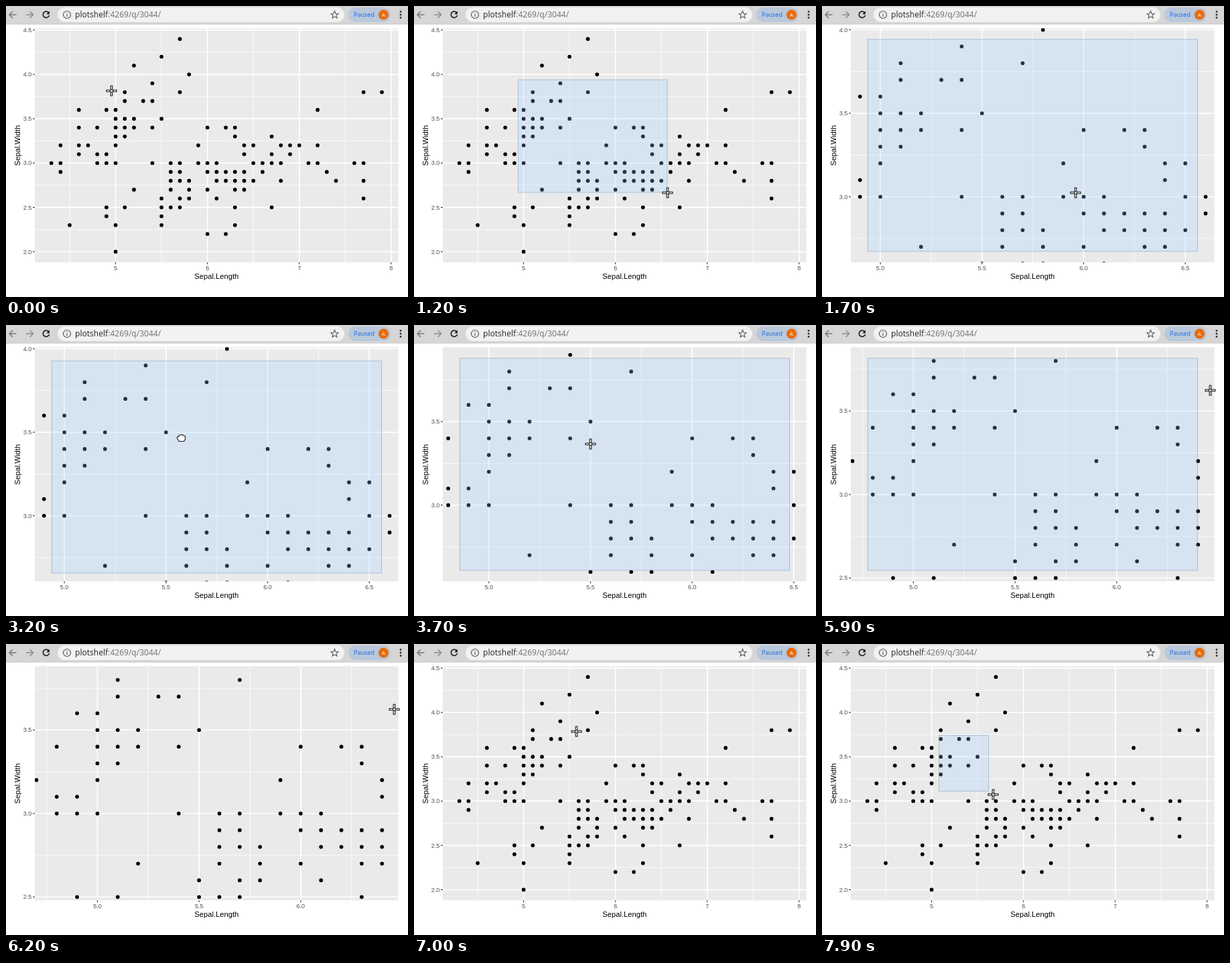
An HTML page with a canvas that plays this animation: 600x434 px, repeating every 8 s.

```html
<!DOCTYPE html>
<html lang="en">
<head>
<meta charset="utf-8">
<title>Scatter plot brushing</title>
<style>
  html, body { margin: 0; width: 100%; height: 100%; overflow: hidden; background: #fff; }
  canvas { display: block; }
</style>
</head>
<body>
<canvas id="stage" width="600" height="434"></canvas>
<script>
const c = document.getElementById('stage').getContext('2d');
const LOOP = 8000, STEP = 100;
const panel = { x: 43, y: 33.3, w: 542.7, h: 349 };
const padX = panel.w / 22, padY = panel.h / 22;

// Lengths in tenths, one row per width, from 2.0 upwards in tenths
const rows = [
  [50], [], [60, 62], [45, 50, 55, 63], [49, 55],
  [49, 51, 55, 56, 57, 63, 67], [55, 57, 58, 61, 77],
  [52, 56, 58, 60, 63, 64], [56, 57, 58, 61, 62, 63, 64, 65, 68, 74, 77],
  [44, 56, 57, 60, 61, 62, 63, 64, 66, 73],
  [43, 44, 48, 49, 50, 54, 56, 57, 59, 60, 61, 65, 66, 67, 68, 71, 72, 76, 77],
  [46, 48, 49, 64, 67, 69], [44, 46, 47, 50, 59, 64, 65, 68, 69, 70, 72],
  [50, 51, 63, 67], [46, 48, 50, 51, 52, 54, 60, 62, 63],
  [50, 51, 52, 55], [46, 49, 50, 72], [51, 53, 54], [51, 57, 77, 79],
  [54], [58], [52], [55], [], [57]
];

// Pointer path: time, x, y
const path = [
  [0, 157, 126], [200, 155, 110], [500, 155, 110], [1200, 378, 278],
  [2400, 378, 278], [2700, 268, 162], [3000, 268, 162], [3200, 261, 168],
  [3500, 236, 186], [3900, 289, 168], [4200, 289, 168], [4500, 250, 183],
  [4800, 236, 192], [4900, 236, 192], [5800, 577, 97], [5900, 579, 97],
  [6500, 579, 97], [7100, 174, 136], [7400, 174, 136], [7900, 255, 224]
];

const clamp = (v, lo, hi) => Math.min(hi, Math.max(lo, v));

function pointerAt(t) {
  const i = path.findIndex(k => k[0] >= t);
  if (i === 0) return { x: path[0][1], y: path[0][2] };
  const [t0, x0, y0] = path[i - 1], [t1, x1, y1] = path[i];
  const p = (t - t0) / (t1 - t0);
  return { x: x0 + (x1 - x0) * p, y: y0 + (y1 - y0) * p };
}

// Data limits, padded to the panel edges by the scales
function viewAt(t) {
  if (t < 1700 || t >= 6500) return { x0: 4.3, x1: 7.9, y0: 2, y1: 4.4, stepX: 1 };
  const pans = (t >= 3600) + (t >= 5000);
  const dx = -0.0813 * pans, dy = -0.0637 * pans;
  return { x0: 4.936 + dx, x1: 6.562 + dx, y0: 2.671 + dy, y1: 3.945 + dy, stepX: 0.5 };
}

function brushAt(t, p) {
  if (t >= 600 && t < 1700) return [155, 109.5, p.x + 0.5, p.y + 0.5];
  if (t >= 7500) return [174, 136, p.x - 6, p.y - 4];
  if (t < 1700 || t >= 6200) return null;
  const grip = t >= 3100 && t < 3600 ? [261, 164] : t >= 4300 && t < 5000 ? [281, 167] : null;
  const dx = grip ? clamp(p.x - grip[0], -padX, 0) : 0;
  const dy = grip ? clamp(p.y - grip[1], 0, padY) : 0;
  return [panel.x + padX + dx, panel.y + padY + dy,
    panel.x + panel.w - padX + dx, panel.y + panel.h - padY + dy];
}

function line(x0, y0, x1, y1, color, width) {
  c.strokeStyle = color;
  c.lineWidth = width;
  c.beginPath();
  c.moveTo(x0, y0);
  c.lineTo(x1, y1);
  c.stroke();
}

function disc(x, y, r, color) {
  c.fillStyle = color;
  c.beginPath();
  c.arc(x, y, r, 0, 7);
  c.fill();
}

function text(s, x, y, font, color, align = 'left') {
  c.font = font;
  c.fillStyle = color;
  c.textAlign = align;
  c.fillText(s, x, y);
}

function pill(x, y, w, h, color) {
  c.fillStyle = color;
  c.beginPath();
  c.roundRect(x, y, w, h, h / 2);
  c.fill();
}

function strokePath(d, color, width) {
  c.strokeStyle = color;
  c.lineWidth = width;
  c.stroke(new Path2D(d));
}

function drawToolbar() {
  c.fillStyle = '#d6d6d6';
  c.fillRect(0, 0, 600, 27);
  line(0, 27, 600, 27, '#c4c4c4', 1);
  strokePath('M15.5 13H5.5M10 8L5 13L10 18', '#777', 1.5);
  strokePath('M30 13H40M35.5 8L40.5 13L35.5 18', '#8c8c8c', 1.5);
  strokePath('M63.8 10A4.7 4.7 0 1 0 64.5 14', '#222', 1.7);
  c.fillStyle = '#222';
  c.fill(new Path2D('M65 7.5V12.3H60.2Z'));
  pill(77, 2, 428, 22, '#f2f2f2');
  strokePath('M96.5 13A5.5 5.5 0 1 0 85.5 13A5.5 5.5 0 1 0 96.5 13M91 12.2V16M91 9.8V11', '#555', 1.2);
  const font = '12px "Noto Sans", sans-serif', host = 'plotshelf';
  text(host, 103, 17.2, font, '#333');
  text(':4269/q/3044/', 103 + c.measureText(host).width, 17.2, font, '#777');
  let star = '';
  for (let i = 0; i < 10; i++) {
    const a = i * Math.PI / 5, r = i % 2 ? 2.6 : 5.8;
    star += (i ? 'L' : 'M') + (490.5 + r * Math.sin(a)) + ' ' + (13.3 - r * Math.cos(a));
  }
  strokePath(star + 'Z', '#555', 1.1);
  pill(511, 2, 63, 22, '#bac8dc');
  text('Paused', 519, 16.3, '9px "Noto Sans", sans-serif', '#1a6fe0');
  disc(563.5, 13, 7.6, '#ea6c0a');
  text('A', 563.5, 15.7, '7.5px "Noto Sans", sans-serif', '#fff', 'center');
  for (const y of [8.5, 13, 17.5]) disc(589, y, 1.4, '#333');
}

function ticks(lo, hi, step) {
  const pad = (hi - lo) / 20, out = [];
  for (let i = Math.ceil((lo - pad) / step); i * step <= hi + pad; i++) out.push(i * step);
  return out;
}

function drawPlot(v) {
  const { x, y, w, h } = panel, right = x + w, bottom = y + h;
  const sx = n => x + padX + (n - v.x0) / (v.x1 - v.x0) * (w - 2 * padX);
  const sy = n => bottom - padY - (n - v.y0) / (v.y1 - v.y0) * (h - 2 * padY);
  const font = '9px "Liberation Sans", Arial, sans-serif';

  c.fillStyle = '#eaeaea';
  c.fillRect(x, y, w, h);
  for (const [part, width] of [[2, 0.8], [1, 1.6]]) {
    for (const n of ticks(v.y0, v.y1, 0.5 / part)) line(x, sy(n), right, sy(n), '#fff', width);
    for (const n of ticks(v.x0, v.x1, v.stepX / part)) line(sx(n), y, sx(n), bottom, '#fff', width);
  }
  c.save();
  c.beginPath();
  c.rect(x, y, w, h);
  c.clip();
  rows.forEach((row, i) => row.forEach(n => disc(sx(n / 10), sy(2 + i / 10), 2.85, '#000')));
  c.restore();

  for (const n of ticks(v.y0, v.y1, 0.5)) {
    line(x - 3, sy(n), x, sy(n), '#333', 1.1);
    text(n.toFixed(1), x - 4.8, sy(n) + 3.2, font, '#4d4d4d', 'right');
  }
  for (const n of ticks(v.x0, v.x1, v.stepX)) {
    line(sx(n), bottom, sx(n), bottom + 3, '#333', 1.1);
    text(n.toFixed(v.stepX < 1 ? 1 : 0), sx(n), 394, font, '#4d4d4d', 'center');
  }
  const title = '11.2px "Liberation Sans", Arial, sans-serif';
  text('Sepal.Length', 314.3, 407, title, '#000', 'center');
  c.save();
  c.translate(21, 208);
  c.rotate(-Math.PI / 2);
  text('Sepal.Width', 0, 0, title, '#000', 'center');
  c.restore();
}

function drawBrush([x0, y0, x1, y1]) {
  c.fillStyle = 'rgba(153,204,255,.25)';
  c.fillRect(x0, y0, x1 - x0, y1 - y0);
  c.strokeStyle = 'rgba(0,51,102,.2)';
  c.lineWidth = 1;
  c.strokeRect(x0 + 0.5, y0 + 0.5, x1 - x0 - 1, y1 - y0 - 1);
}

function drawPointer(p, grabbing) {
  c.save();
  c.translate(Math.round(p.x) + 0.5, Math.round(p.y) + 0.5);
  c.fillStyle = '#fff';
  c.strokeStyle = '#111';
  c.lineWidth = 1.1;
  c.lineJoin = 'round';
  if (grabbing) {
    const hand = new Path2D('M-3.5 5V4L-6 1V-1Q-5.5-2.5-3.7-2Q-3.7-5-1.3-4.3Q0-5.6 1.3-4.3Q3-5 3.7-3.5Q6-3.8 6-1V2L4.5 4V5Z');
    c.fill(hand);
    c.stroke(hand);
  } else {
    for (let i = 0; i < 4; i++) {
      c.fillRect(2, -1.3, 5.5, 2.6);
      c.strokeRect(2, -1.3, 5.5, 2.6);
      c.rotate(Math.PI / 2);
    }
  }
  c.restore();
}

function frame(now) {
  const t = Math.floor(now % LOOP / STEP) * STEP;
  const p = pointerAt(t), brush = brushAt(t, p);
  c.clearRect(0, 0, 600, 434);
  drawToolbar();
  drawPlot(viewAt(t));
  if (brush) drawBrush(brush);
  drawPointer(p, t >= 2900 && t < 3600 || t >= 4000 && t < 5000);
  requestAnimationFrame(frame);
}
requestAnimationFrame(frame);
</script>
</body>
</html>
```
